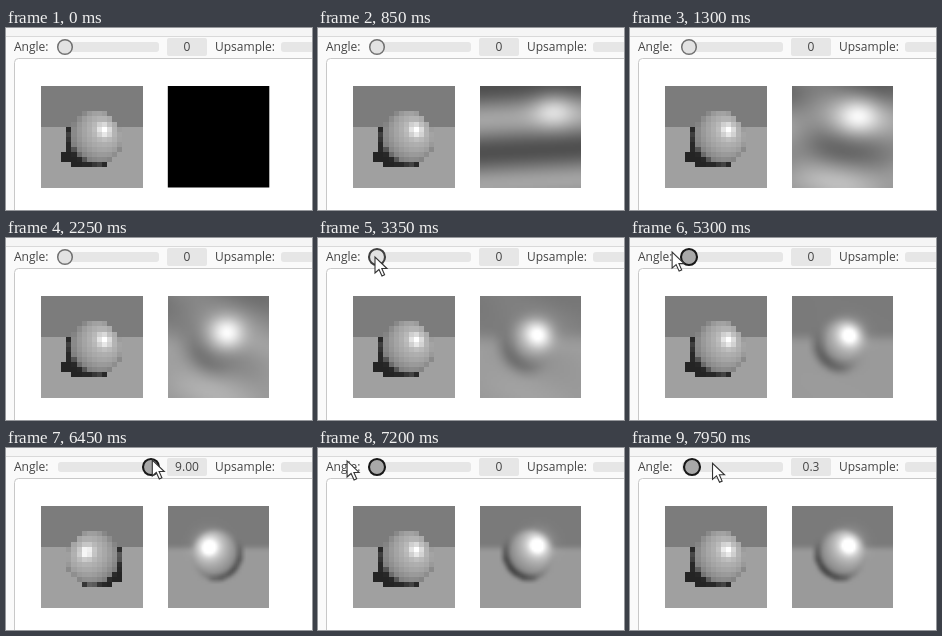
Write an HTML page with a canvas that moves like this. It is 306 px wide and 182 px high and loops after 8 s.

```html
<!DOCTYPE html>
<html lang="en">
<head>
<meta charset="utf-8">
<title>Angle slider</title>
<style>
  html, body { margin: 0; width: 100%; height: 100%; overflow: hidden; background: #fafafa; }
  canvas, svg { position: absolute; left: 0; top: 0; display: block; width: 306px; height: 182px; overflow: hidden; }
  text { font: 12px "Open Sans", "Noto Sans", sans-serif; fill: #444; }
</style>
</head>
<body>
<canvas id="view" width="306" height="182"></canvas>
<svg viewBox="0 0 306 182">
  <rect width="306" height="8" fill="#f5f5f5"/>
  <rect y="8" width="306" height="1" fill="#d9d9d9"/>
  <path d="M306 30.5H12.5Q8.5 30.5 8.5 34.5V182" fill="none" stroke="#c8c8c8"/>
  <text x="8" y="23">Angle:</text>
  <text x="209" y="23">Upsample:</text>
  <rect x="52" y="14" width="101" height="10" rx="3" fill="#e6e6e6"/>
  <path d="M306 14H278Q275 14 275 17V21Q275 24 278 24H306Z" fill="#e6e6e6"/>
  <rect x="161" y="10" width="40" height="18" rx="2" fill="#e6e6e6"/>
  <text id="value" x="181" y="23" text-anchor="middle">0</text>
  <circle id="knob" cy="19"/>
  <path id="cursor" d="M0 0V16L4 12.5L7 19L9.6 17.8L6.8 11.5H12Z" fill="#fff" stroke="#333" stroke-width="1.1"/>
</svg>
<script>
const LOOP = 8000, STEP = 50;
const LEFT = 35, RIGHT = 161.8, TOP = 58, SIZE = 101.5;
const CELLS = 20, GRID = 51;
const KNOB_MIN = 59, KNOB_SPAN = 86, MAX_ANGLE = 9, LAG = 115;
const START = 150, SHOW = 3200, HOVER = 3300, GRAB = 3500;
// Turning points of the cursor: time, x
const turns = [[3200, 75], [3340, 57], [3500, 57], [4250, 184], [5320, 42], [6080, 172], [7480, 14], [8120, 96]];

const $ = id => document.getElementById(id);
const ctx = $('view').getContext('2d');
const clamp = (v, lo = 0, hi = 1) => Math.min(hi, Math.max(lo, v));
const lerp = (a, b, k) => a + (b - a) * k;
const ease = k => (1 - Math.cos(Math.PI * k)) / 2;
const decay = (t, span) => Math.exp(-Math.max(0, t - 850) / span);

function cursorX(t) {
  const i = Math.max(1, turns.findIndex(p => p[0] >= t));
  const [t0, x0] = turns[i - 1], [t1, x1] = turns[i];
  return lerp(x0, x1, ease(clamp((t - t0) / (t1 - t0))));
}
const cursorY = t => 15.5 + 3.5 * Math.cos(2 * Math.PI * (t - 3350) / 6200);
const turnAt = t => t < GRAB ? 0 : clamp((cursorX(t - LAG) - KNOB_MIN) / KNOB_SPAN);

function lightAt(turn) {
  const x = lerp(0.36, -0.3, turn), y = lerp(-0.35, -0.28, turn);
  return [x, y, Math.sqrt(1 - x * x - y * y)];
}

// Brightness on a unit ball
function shade(x, y, light) {
  const z = Math.sqrt(Math.max(0, 1 - x * x - y * y));
  const dot = Math.max(0, x * light[0] + y * light[1] + z * light[2]);
  return 40 + clamp(dot * 5) * (70 + 75 * dot) + 75 * dot ** 30;
}

function makeBuffer(size, smooth) {
  const canvas = document.createElement('canvas');
  canvas.width = canvas.height = size;
  const pen = canvas.getContext('2d'), image = pen.createImageData(size, size);
  return (value, left) => {
    for (let i = 0; i < size * size; i++) {
      const v = value(i % size, Math.floor(i / size));
      image.data.set([v, v, v, 255], i * 4);
    }
    pen.putImageData(image, 0, 0);
    ctx.imageSmoothingEnabled = smooth;
    ctx.drawImage(canvas, left, TOP, SIZE, SIZE);
  };
}
const paintCells = makeBuffer(CELLS, false), paintSoft = makeBuffer(GRID, true);

function drawScene(turn) {
  const light = lightAt(turn), shadow = lerp(8, 11, turn);
  paintCells((col, row) => {
    const x = (col - 10) / 5.5, y = (row - 10) / 5.5;
    if (Math.hypot(x, y) <= 1) return shade(x, y, light);
    if (Math.hypot((col - shadow) / 4.6, (row - 13.2) / 2.3) <= 1) return 36;
    return row < 8 ? 124 : 160;
  }, LEFT);
}

// Box blur along one axis, edges held
function blur(src, radius, dx, dy) {
  const at = v => clamp(v, 0, GRID - 1);
  return src.map((_, i) => {
    const x = i % GRID, y = Math.floor(i / GRID);
    let sum = 0;
    for (let r = -radius; r <= radius; r++) sum += src[at(y + r * dy) * GRID + at(x + r * dx)];
    return sum / (2 * radius + 1);
  });
}

// The learned copy: wide bands first, then a blurred ball that sharpens
function drawLearned(t, turn) {
  const light = lightAt(turn), rough = decay(t, 900), mid = 4 * rough * (1 - rough);
  const radius = Math.round(1 + 6 * decay(t, 2000));
  let field = Float32Array.from({ length: GRID * GRID }, (_, i) => {
    const x = (i % GRID * 2 - 48) / 25, y = (Math.floor(i / GRID) * 2 - 48) / 25;
    const ground = y < -0.3 ? 122 : 154;
    return Math.hypot(x, y) <= 1 ? shade(x, y, light) : ground;
  });
  for (let pass = 0; pass < 2; pass++) field = blur(blur(field, radius, 1, 0), radius, 0, 1);

  const glowX = 48 + 25 * light[0] + 16 * rough, glowY = 48 + 25 * light[1] - 14 * rough - 2;
  const wide = 9 + 6 * decay(t, 2000), tall = wide - 3 * rough;
  const appear = ease(clamp((t - START) / 700));
  paintSoft((col, row) => {
    const x = col * 2, y = row * 2;
    const bands = 122 - 42 * Math.cos(2 * Math.PI * (y + 0.05 * x) / 66);
    const swirl = mid * (14 - 18 * Math.cos(2 * Math.PI * (0.82 * y - 0.57 * x - 19) / 70));
    const glow = 62 * Math.exp(-(((x - glowX) / wide) ** 2 + ((y - glowY) / tall) ** 2) / 2);
    return lerp(95, lerp(field[row * GRID + col], bands, rough) + swirl + glow, appear);
  }, RIGHT);
}

function drawControls(t, turn) {
  const knob = $('knob'), hover = t >= HOVER, held = t >= GRAB;
  const set = (name, value) => knob.setAttribute(name, value);
  set('cx', KNOB_MIN + turn * KNOB_SPAN);
  set('r', hover ? 8 : 7.3);
  set('fill', held ? '#a8a8a8' : '#e2e2e2');
  set('stroke', held ? '#181818' : hover ? '#404040' : '#707070');
  set('stroke-width', hover ? 2.1 : 1.5);
  const angle = turn * MAX_ANGLE;
  $('value').textContent = angle ? angle.toFixed(angle < 1 ? 1 : 2) : '0';
  $('cursor').setAttribute('transform', `translate(${cursorX(t)} ${cursorY(t)})`);
  $('cursor').style.display = t < SHOW ? 'none' : '';
}

let last = -1;
function frame(now) {
  const t = Math.floor(now % LOOP / STEP) * STEP;
  if (t !== last) {
    last = t;
    const turn = turnAt(t);
    ctx.fillStyle = '#fff';
    ctx.fillRect(9, 31, 297, 151);
    drawScene(turn);
    if (t < START) {
      ctx.fillStyle = '#000';
      ctx.fillRect(RIGHT, TOP, SIZE, SIZE);
    } else {
      drawLearned(t, turn);
    }
    drawControls(t, turn);
  }
  requestAnimationFrame(frame);
}
frame(performance.now());
</script>
</body>
</html>
```
